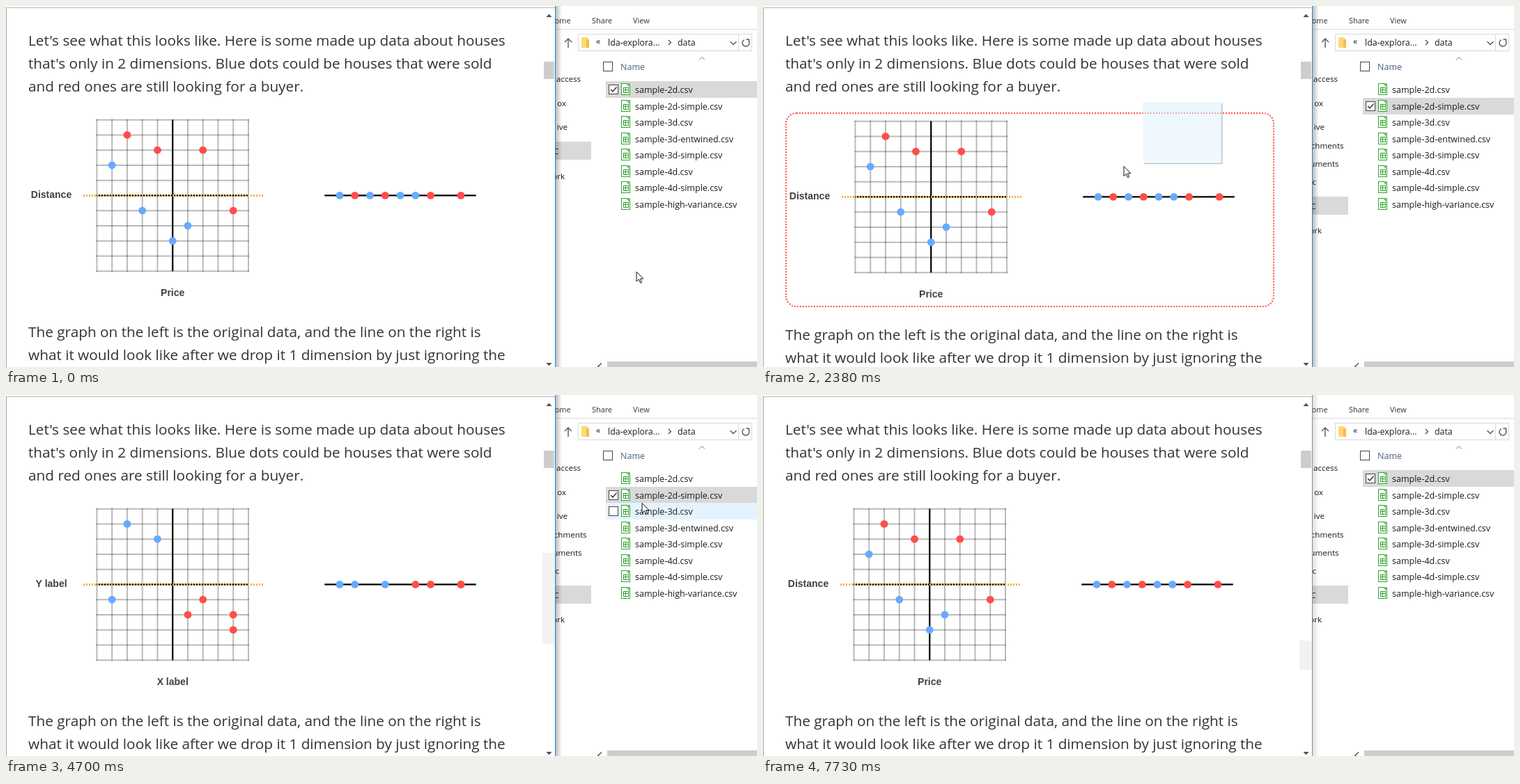
An HTML page with a canvas that plays this animation: 1078x519 px, repeating every 7.83 s.

```html
<!DOCTYPE html>
<html lang="en">
<head>
<meta charset="utf-8">
<title>Dropping CSV files on a chart</title>
<style>
  html, body { margin: 0; width: 100%; height: 100%; overflow: hidden; background: #fff; }
  canvas { display: block; }
</style>
</head>
<body>
<canvas width="1078" height="519"></canvas>
<script>
const ctx = document.querySelector('canvas').getContext('2d');
const LOOP = 7830, RED = '#ff4d4a', BLUE = '#66aaff', ROW = 23.55, CELL = 21.75;
const UI = '"Open Sans", "Noto Sans", sans-serif';

// Cursor moves: start, end, steps, target x, target y
const START = [905, 382];
const MOVES = [
  [720, 1490, 13, 938, 150], [1540, 1580, 2, 936, 147],
  [2160, 2160, 1, 800, 172], [2230, 2560, 6, 236, 289],
  [3250, 3420, 4, 561, 417], [3970, 4210, 5, 836, 212],
  [4350, 4350, 1, 848, 226], [4410, 4700, 6, 913, 155.5], [4760, 5030, 5, 925, 128],
  [5620, 5620, 1, 785, 168], [5690, 6050, 6, 411, 310],
  [6350, 6750, 8, 1031, 393], [7010, 7380, 8, 1046, 519]
];

// Points: x, y in grid units
const HOUSES = { x: 'Price', y: 'Distance',
  red: [[-3, 4], [-1, 3], [2, 3], [4, -1]], blue: [[-4, 2], [-2, -1], [1, -2], [0, -3]] };
const SIMPLE = { x: 'X label', y: 'Y label',
  red: [[2, -1], [1, -2], [4, -2], [4, -3]], blue: [[-3, 4], [-1, 3], [-4, -1]] };

const FILES = ['2d', '2d-simple', '3d', '3d-entwined', '3d-simple', '4d', '4d-simple', 'high-variance'];

// Folder labels: visible end of the name, right edge, centre y
const TOP_FOLDERS = [['access', 825, 104], ['ox', 804, 139], ['ive', 806, 173]];
const SUB_FOLDERS = [['chments', 833.5, 200], ['uments', 826.5, 226], ['c', 794, 252]];

const between = (t, a, b) => t >= a && t < b;
const mix = (a, b, u) => a + (b - a) * u;

function cursorAt(t) {
  let [x, y] = START;
  for (const [from, to, steps, tx, ty] of MOVES) {
    if (t < from) break;
    const step = to > from ? Math.floor((t - from) / (to - from) * (steps - 1) + 0.001) : 0;
    const u = Math.min(1, (step + 1) / steps), e = u * u * (3 - 2 * u);
    x = mix(x, tx, e);
    y = mix(y, ty, e);
  }
  return [x, y];
}

function rect(x, y, w, h, color) {
  ctx.fillStyle = color;
  ctx.fillRect(x, y, w, h);
}

function box(x, y, w, h, color) {
  ctx.strokeStyle = color;
  ctx.lineWidth = 1;
  ctx.strokeRect(x, y, w, h);
}

function line(points, color, width = 1, dash = []) {
  ctx.strokeStyle = color;
  ctx.lineWidth = width;
  ctx.setLineDash(dash);
  ctx.beginPath();
  points.forEach(p => ctx.lineTo(...p));
  ctx.stroke();
  ctx.setLineDash([]);
}

function shape(points, color) {
  ctx.fillStyle = color;
  ctx.beginPath();
  points.forEach(p => ctx.lineTo(...p));
  ctx.closePath();
  ctx.fill();
}

function dot(x, y, color) {
  ctx.fillStyle = color;
  ctx.beginPath();
  ctx.arc(x, y, 5.4, 0, 7);
  ctx.fill();
}

function text(str, x, y, size, color = '#1a1a1a', align = 'left', font = UI, weight = '') {
  ctx.font = `${weight} ${size}px ${font}`;
  ctx.fillStyle = color;
  ctx.textAlign = align;
  ctx.fillText(str, x, y);
}

function chart(data) {
  const cx = 239.2, cy = 272.4, half = 5 * CELL, lineX = 566;
  const label = (str, x, y) =>
    text(str, x, y, 14, '#404040', 'center', '"Liberation Sans", Arial, sans-serif', 'bold');
  for (let i = -5; i <= 5; i++) {
    const d = i * CELL;
    line([[cx + d, cy - half - 1], [cx + d, cy + half + 1]], 'rgba(0,0,0,.27)', 2);
    line([[cx - half - 1, cy + d], [cx + half + 1, cy + d]], 'rgba(0,0,0,.27)', 2);
  }
  line([[cx, cy - half], [cx, cy + half]], '#000', 2.2);
  line([[cx - half, cy], [cx + half, cy]], '#000', 2.2);
  line([[111, cy], [371, cy]], '#f0b040', 3, [2, 2]);
  line([[lineX - half, cy], [lineX + half, cy]], '#000', 2.2);
  for (const [points, color] of [[data.red, RED], [data.blue, BLUE]]) {
    for (const [x, y] of points) {
      dot(cx + x * CELL, cy - y * CELL, color);
      dot(lineX + x * CELL, cy, color);
    }
  }
  label(data.y, 65, 276);
  label(data.x, cx, 417);
}

function windowEdge(blurred) {
  const shadow = ctx.createLinearGradient(789, 0, 798, 0);
  shadow.addColorStop(0, `rgba(0,0,0,${blurred ? 0.12 : 0.26})`);
  shadow.addColorStop(1, 'rgba(0,0,0,0)');
  rect(789, 0, 9, 519, shadow);
  rect(788, 0, 1, 519, blurred ? '#8c8c8c' : '#2288cc');
}

function browser(t, dropping, blurred) {
  const para = (lines, y) => lines.forEach((s, i) => text(s, 32, y + i * 33.2, 20.75, '#333'));
  rect(0, 0, 788, 519, '#fff');
  line([[0, 2.5], [788, 2.5]], '#b4b4b4');
  line([[0.5, 3], [0.5, 519]], '#a8a8a8');
  para(["Let's see what this looks like. Here is some made up data about houses",
    "that's only in 2 dimensions. Blue dots could be houses that were sold",
    'and red ones are still looking for a buyer.'], 56.5);
  const shift = dropping ? 2 : 0;
  ctx.save();
  ctx.translate(shift, shift);
  chart(between(t, 3050, 6350) ? SIMPLE : HOUSES);
  ctx.restore();
  if (dropping) {
    ctx.strokeStyle = RED;
    ctx.lineWidth = 2;
    ctx.setLineDash([2, 2]);
    ctx.beginPath();
    ctx.roundRect(33, 154, 700, 278, 15);
    ctx.stroke();
    ctx.setLineDash([]);
  }
  para(['The graph on the left is the original data, and the line on the right is',
    'what it would look like after we drop it 1 dimension by just ignoring the'], 476 + 2 * shift);

  if (between(t, 4210, 5690)) rect(770, 227, 18, 131, '#f2f2f2');
  if (t >= 6750) rect(770, 353, 18, 42, '#f2f2f2');
  rect(772, 80, 15, 25, '#cdcdcd');
  shape([[775.5, 16], [783.5, 16], [779.5, 11.5]], '#505050');
  shape([[775.5, 513], [783.5, 513], [779.5, 517.5]], '#505050');
  windowEdge(blurred);
}

function folders(expanded, hovered) {
  ctx.save();
  ctx.beginPath();
  ctx.rect(788, 34, 60, 485);
  ctx.clip();
  const y = expanded ? 287 : 208;
  if (hovered) rect(789, 213, 52, 26, '#e5f3ff');
  rect(789, y - 13, 51, 26, '#d9d9d9');
  const items = [...TOP_FOLDERS, ...(expanded ? SUB_FOLDERS : []),
    ['C', 793.5, y], ['ork', 802, expanded ? 322 : 244]];
  for (const [name, x, cy] of items) text(name, x, cy + 4.5, 11.6, '#1a1a1a', 'right');
  ctx.restore();
}

function checkbox(x, y, checked) {
  rect(x, y, 13, 13, '#fff');
  box(x + 0.5, y + 0.5, 13, 13, '#444');
  if (checked) line([[x + 3, y + 7], [x + 6, y + 10], [x + 11.5, y + 3.5]], '#222', 1.2);
}

function fileIcon(x, y) {
  const green = '#2fa32f';
  shape([[x, y], [x + 8, y], [x + 13, y + 5], [x + 13, y + 17], [x, y + 17]], green);
  shape([[x + 1, y + 1], [x + 7.5, y + 1], [x + 12, y + 5.5], [x + 12, y + 16], [x + 1, y + 16]], '#fff');
  shape([[x + 8, y], [x + 13, y], [x + 13, y + 5]], '#6cc46c');
  box(x + 3.5, y + 6.5, 7, 7, green);
  line([[x + 3, y + 9.5], [x + 11, y + 9.5]], green);
  line([[x + 6.5, y + 6], [x + 6.5, y + 14]], green);
}

function explorer(t, selected, hovered, sideHover) {
  text('ome', 810.5, 25, 10.9, '#333', 'right');
  text('Share', 841, 25, 10.9, '#333');
  text('View', 900, 25, 10.9, '#333');
  line([[789, 33.5], [1078, 33.5]], '#dcdcdc');

  line([[807, 60], [807, 47]], '#555', 1.4);
  line([[802, 52], [807, 47], [812, 52]], '#555', 1.4);
  box(821.5, 40.5, 230, 24, '#d9d9d9');
  box(1051.5, 40.5, 19, 24, '#d9d9d9');
  rect(826, 45, 9, 15, '#ffd874');
  rect(833, 48, 4, 12, '#f3bf4a');
  text('«', 847, 55, 12.4);
  text('lda-explora...', 864, 56.5, 12.4);
  line([[951, 49], [954.5, 52.5], [951, 56]], '#444', 1.2);
  text('data', 964, 56.5, 12.4);
  line([[1039.5, 51], [1044, 55.5], [1048.5, 51]], '#555', 1.3);
  ctx.strokeStyle = '#555';
  ctx.lineWidth = 1.4;
  ctx.beginPath();
  ctx.arc(1062, 53, 5, -0.5, 4.2);
  ctx.stroke();
  line([[1062.5, 48], [1066.5, 48], [1066.5, 52]], '#555', 1.4);

  folders(t >= 1870, sideHover);

  line([[995, 77.5], [999, 73.5], [1003, 77.5]], '#777');
  checkbox(857, 80);
  text('Name', 882, 91.5, 12.5, '#4c607a');
  FILES.forEach((name, i) => {
    const y = 120 + i * ROW, on = i === selected;
    if (on || i === hovered) {
      rect(861, Math.round(y) - 12, 217, 24, on ? '#d9d9d9' : '#e5f3ff');
      checkbox(865, Math.round(y) - 7, on);
    }
    fileIcon(883, Math.round(y) - 9);
    text(`sample-${name}.csv`, 903, Math.round(y) + 4.5, 12.5);
  });
  rect(863, 511, 215, 8, '#cdcdcd');
  line([[855, 513.5], [850, 518], [852, 520]], '#505050', 1.5);
}

function dragImage(x, y) {
  const fill = ctx.createLinearGradient(0, y - 75, 0, y + 14);
  fill.addColorStop(0, 'rgba(222,240,250,.6)');
  fill.addColorStop(1, 'rgba(222,240,250,.4)');
  rect(x - 57, y - 75, 113, 88, fill);
  line([[x - 55, y + 13.5], [x + 56.5, y + 13.5], [x + 56.5, y - 73]], 'rgba(90,110,125,.4)', 1.5);
}

function pointer(x, y) {
  const points = [[0, 0], [0, 14], [3.2, 11], [5.6, 16.2], [7.6, 15.3], [5.3, 10.3], [9.8, 10]]
    .map(([px, py]) => [x + px, y + py]);
  shape(points, '#fff');
  line([...points, points[0]], '#111');
}

function draw(t) {
  const [x, y] = cursorAt(t);
  const overList = x > 860 && y >= 108;
  const hovered = overList ? Math.floor((y - 108) / ROW) : -1;
  const dragging = between(t, 2160, 3000) || between(t, 5620, 6290);
  const dropping = (dragging || between(t, 6290, 6350)) && x < 734 && y > 153;
  const blurred = (between(t, 1820, 3000) || between(t, 5330, 6290)) && !dropping || t >= 7730;

  rect(0, 0, 1078, 519, '#fff');
  explorer(t, between(t, 1820, 5330) ? 1 : 0, hovered, between(t, 4210, 4350));
  browser(t, dropping, blurred);
  if (dragging) {
    const [px, py] = cursorAt(t - 70);
    dragImage(mix(px, x, 0.38), mix(py, y, 0.38));
  }
  pointer(x, y);
}

function tick(now) {
  draw(now % LOOP);
  requestAnimationFrame(tick);
}
requestAnimationFrame(tick);
</script>
</body>
</html>
```
